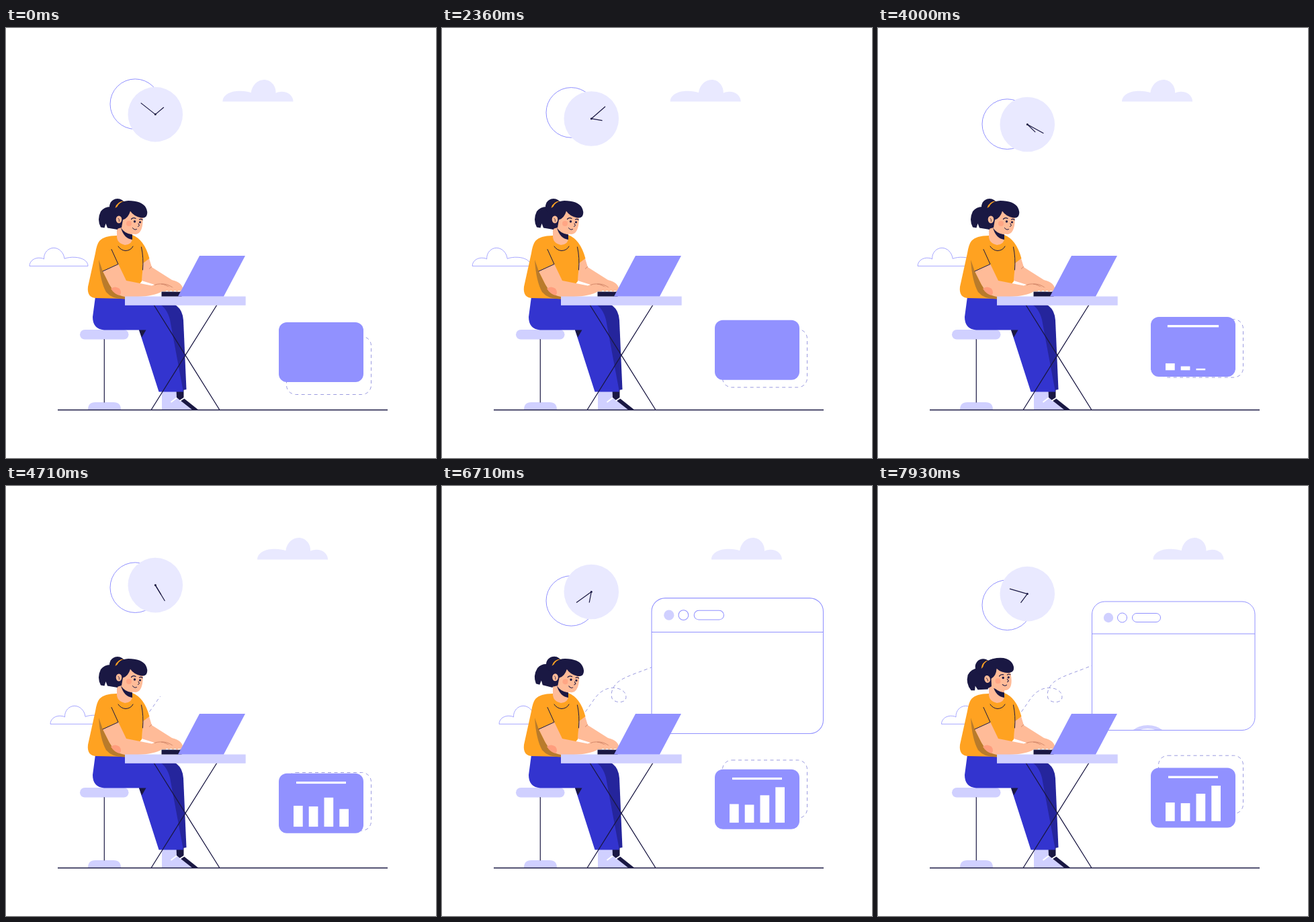
An HTML page for the animation above (8000 ms loop, 640 px wide and 640 px high).

```html
<!DOCTYPE html>
<html lang="en">
<head>
<meta charset="utf-8">
<title>Working at a desk</title>
<style>
  html, body { margin: 0; width: 100%; height: 100%; overflow: hidden; background: #fff; }
  svg { display: block; width: 100%; height: 100%; }
  .navy { fill: #1a1843; }
  .pale { fill: #d0d0ff; }
  .mist { fill: #e9e9ff; }
  .violet { fill: #9191ff; }
  .skin { fill: #ffbb98; }
  .orange { fill: #ffa221; }
  .blush { fill: #ff9d7d; }
  .white { fill: #fff; }
  .outline { fill: none; stroke: #9191ff; stroke-width: 1; }
  .ink { fill: none; stroke: #1a1843; stroke-width: 1.2; stroke-linecap: round; }
  .dash { fill: none; stroke: #8f8fdc; stroke-width: .9; }
</style>
</head>
<body>
<svg viewBox="0 0 640 640">
  <defs>
    <path id="cloud" d="M0 0C0-8 8-13 16-12Q19-12 21.500-10.500C21-20 28-27 36-27S51-20 52-11C56-12.500 62-13.500 68-13C78-12.500 87-8 87 0Z"/>
    <path id="swirl" d="M208 343C213 337 220 327 226 318C237 302 250 299 260 301C272 303 276 312 273 318C268 324 256 322 253 316C250 306 256 296 264 290C280 280 300 276 330 262"/>
    <mask id="reveal" maskUnits="userSpaceOnUse" x="0" y="0" width="640" height="640">
      <use id="trim" href="#swirl" fill="none" stroke="#fff" stroke-width="4"/>
    </mask>
    <clipPath id="page"><rect x="318.500" y="220" width="242.500" height="143.500"/></clipPath>
  </defs>

  <use id="leftCloud" href="#cloud" class="outline" style="stroke-width:.8"/>
  <use id="rightCloud" href="#cloud" class="mist"/>

  <circle id="ring" cx="192.300" r="37.300" class="outline"/>
  <g id="clock">
    <circle r="40.800" class="mist"/>
    <path id="minute" class="ink" d="M0 0V-27"/>
    <path id="hour" class="ink" d="M0 0V-16"/>
    <circle r="1.500" class="navy"/>
  </g>

  <use href="#swirl" class="dash" stroke-dasharray="5 4" mask="url(#reveal)"/>

  <g id="browser">
    <rect x="318.500" y="172" width="242.500" height="191.500" rx="19" class="white"/>
    <g clip-path="url(#page)">
      <circle id="donut" cx="401.500" r="35" fill="none" stroke="#d0d0ff" stroke-width="5"/>
    </g>
    <g class="outline">
      <rect x="318.500" y="172" width="242.500" height="191.500" rx="19"/>
      <path d="M318.500 220H561"/>
      <circle cx="363.500" cy="196" r="7"/>
      <rect x="378.500" y="189.500" width="42" height="13" rx="6.500"/>
    </g>
    <circle cx="343" cy="196" r="7.200" class="pale"/>
  </g>

  <rect id="shadowCard" x="417.500" width="126" height="86.500" rx="14" class="dash" stroke-dasharray="5 4.500"/>
  <g id="card">
    <rect x="406" width="126" height="89" rx="12" class="violet"/>
    <rect id="heading" x="-37" y="-1.600" width="74" height="3.200" class="white"/>
    <g id="bars" class="white"></g>
  </g>

  <!-- floor, stool -->
  <path class="pale" d="M122 568Q122 557 133 557H160Q171 557 171 568Z"/>
  <rect x="110" y="449" width="72.500" height="14.500" rx="7.250" class="pale"/>
  <path class="ink" d="M146.300 463.500V557"/>

  <!-- legs and shoes -->
  <path class="pale" d="M232 541H254V551L262 554L278 568H232Z"/>
  <path class="navy" d="M253.500 538H264.500V551L286.500 568.500H277.500L259 554L254 550Z"/>
  <path d="M245.500 557L254 550.500M258.500 555L267 549.500" stroke="#fff" stroke-width="2"/>
  <path fill="#25259c" d="M228 408L250 411Q263 418 264 435L268.500 538L258 540Z"/>
  <path fill="#3334cf" d="M133 400L185 401L228 411Q239 416 244 434Q251 472 264 541.500H227.500L198 449.500H146Q129 448 129 430Z"/>
  <path class="navy" d="M198 449.500H208.500L202 460.500Z"/>

  <!-- torso and arms -->
  <path class="skin" d="M203 350L213 343L217 356L247 375Q261 378 263 387L261 391L240 388L202 376Z"/>
  <path class="orange" d="M165 309Q146 309 139 317Q135 322 133 335L122 385Q120 402 135 402L180 403L202 377L204 350L213.500 343Q206 315 188 308Z"/>
  <path fill="#b97b2b" d="M138 345L144 362L153 380Q162 395 178 399V403.500Q158 404 149 393Q140 377 138 345Z"/>
  <path class="skin" d="M144 362L167 351L179 376L217 383.500Q228 378 238 383L256 392H232Q221 399 195 400H177Q163 398 154 382Z"/>
  <path class="blush" d="M156 388Q162 383 169 388Q173 394 169 398Q161 396 156 388Z"/>
  <path d="M221 382.500Q230 379 238 383L253 391M231 381Q240 380 249 387M213 358.500L217 355" fill="none" stroke="#c97d60" stroke-width=".8"/>
  <path class="skin" d="M165 288V308Q164 320 177 323Q188 322 188 313V298Z"/>
  <path class="navy" d="M171 297Q176 306 188 307.500V315Q175 313 171 297Z"/>
  <path class="ink" style="stroke-width:1" d="M167 325Q171 331 178 331.500Q186 331 189 325M157 329.500L167 351.500L144 362M201.500 326Q205 342 203.500 360"/>

  <g id="head">
    <path id="ponytail" class="navy" d="M166 300L151 297.500L148.500 291L146.500 297.500L141 296.500Q135 285 141 273Q147 265 158 266L172 276Z"/>
    <circle cx="166" cy="266" r="12" class="navy"/>
    <path class="skin" d="M165 280L185 270L204 280L203.500 290Q202 306 193 307Q181 307 171 297L165 294Z"/>
    <path class="navy" d="M162 271Q166 258 182 257Q202 257 208 267Q212 274 209 280Q207 283 201 282.500Q190 280 185 272.500Q182 283 174 285.500L172 297L165 299Z"/>
    <path class="orange" d="M162.500 268Q165 258 176 257.500Q168 260 165.500 266Z"/>
    <ellipse cx="168" cy="285" rx="4.300" ry="5.500" class="skin"/>
    <path class="ink" style="stroke-width:.8" d="M167 283Q169 284 168.500 288"/>
    <circle cx="183" cy="291" r="4" class="blush" opacity=".7"/>
    <g class="navy"><circle cx="191.500" cy="288" r="1.700"/><circle cx="199.500" cy="289" r="1.600"/></g>
    <path class="ink" d="M186.500 284.500Q189 281.500 193 283.500M198.500 285Q201 283.500 203 285.500"/>
    <path class="ink" style="stroke-width:1" d="M197 291L198.500 294L196.500 295.500M188.500 297.500Q191 301.500 194.500 299.500"/>
  </g>

  <!-- table and laptop -->
  <path class="ink" style="stroke-width:1.3;stroke-linecap:butt" d="M220 412L318 568.500M314 412L216 568.500M77 568.500H568"/>
  <rect x="177" y="399.500" width="179.700" height="13.300" class="pale"/>
  <rect x="231.500" y="392.500" width="30" height="7" class="navy"/>
  <path class="skin" d="M236 384L252 387L262 391.500L257 392.500L236 391Z"/>
  <path d="M238 391.500H259" stroke="#fff" stroke-width="1" stroke-dasharray="3 3"/>
  <path class="violet" d="M288 339H356L324 399.500H256Z"/>
</svg>

<script>
const LOOP = 8;
const TIMES = [0, 1.43, 3.21, 4.71, 5.71, 6.71, 7.93];
const el = id => document.getElementById(id);
const place = (id, transform) => el(id).setAttribute('transform', transform);
const clamp = x => Math.min(1, Math.max(0, x));
const smooth = x => { x = clamp(x); return x * x * (3 - 2 * x); };

// Smooth curve through one value per entry of TIMES, starting at rest.
function track(...values) {
  const last = TIMES.length - 1;
  const slope = i => {
    if (i === 0) return 0;
    const j = Math.min(i + 1, last);
    return (values[j] - values[i - 1]) / (TIMES[j] - TIMES[i - 1]);
  };
  return t => {
    let i = 0;
    while (i < last - 1 && t > TIMES[i + 1]) i++;
    const span = TIMES[i + 1] - TIMES[i];
    const u = Math.min(1, (t - TIMES[i]) / span);
    const s = u * u * (3 - 2 * u);
    return values[i] * (1 - s) + values[i + 1] * s +
      span * u * (1 - u) * ((1 - u) * slope(i) - u * slope(i + 1));
  };
}

// Grow from nothing past full size, then settle.
function pop(t, start) {
  return 1.13 * smooth(t - start) - 0.13 * smooth((t - start - 1) / 0.8);
}

const drift = track(0, .076, .332, .593, .762, .902, 1);
const leftCloudX = track(35, 39, 52, 66, 76, 85, 94.5);
const cardY = track(438, 436.8, 432.4, 427.8, 424.6, 421.8, 419.5);
const shadowY = track(459, 455, 441, 426.5, 416.3, 408, 401.2);

const bars = [[428, 27.7, 3.62], [450.7, 26.7, 3.72], [473.5, 40.8, 3.86], [496.3, 52.8, 4.25]]
  .map(([x, height, start]) => {
    const rect = document.createElementNS('http://www.w3.org/2000/svg', 'rect');
    rect.setAttribute('x', x);
    rect.setAttribute('width', 13.7);
    el('bars').append(rect);
    return { rect, height, start };
  });

function draw(t) {
  const d = drift(t);
  place('leftCloud', `translate(${leftCloudX(t)} 354.300)`);
  place('rightCloud', `translate(${427.5 + 87 * d} 109.500) scale(-1.207 1.207)`);

  el('ring').setAttribute('cy', 113.2 + 64 * d);
  place('clock', `translate(222.300 ${128.6 + 32 * d})`);
  place('minute', `rotate(${-51.7 + 42.6 * t})`);
  place('hour', `rotate(${50 + 21 * t})`);

  const drawn = Math.max(0, (t - 4.4) * 119);
  el('trim').setAttribute('stroke-dasharray', `${drawn} 999`);

  place('browser', `translate(440 268) scale(${pop(t, 5.87)}) translate(-440 -268)`);
  el('donut').setAttribute('cy', 401 - 40 * Math.max(0, t - 7.5) ** 2);

  el('shadowCard').setAttribute('y', shadowY(t));
  place('card', `translate(0 ${cardY(t)})`);
  place('heading', `translate(469 13.700) scale(${pop(t, 2.45)})`);
  for (const { rect, height, start } of bars) {
    const h = height * pop(t, start);
    rect.setAttribute('y', 79.3 - h);
    rect.setAttribute('height', h);
  }

  const nod = smooth((t - 6.1) / 0.6);
  const turn = smooth((t - 6.7) / 1.2);
  place('head', `rotate(${1.2 * nod - 13.2 * turn} 177 312)`);
  place('ponytail', `rotate(${4 * (nod - turn)} 160 275)`);
}

function frame(now) {
  draw(now / 1000 % LOOP);
  requestAnimationFrame(frame);
}
draw(0);
requestAnimationFrame(frame);
</script>
</body>
</html>
```
